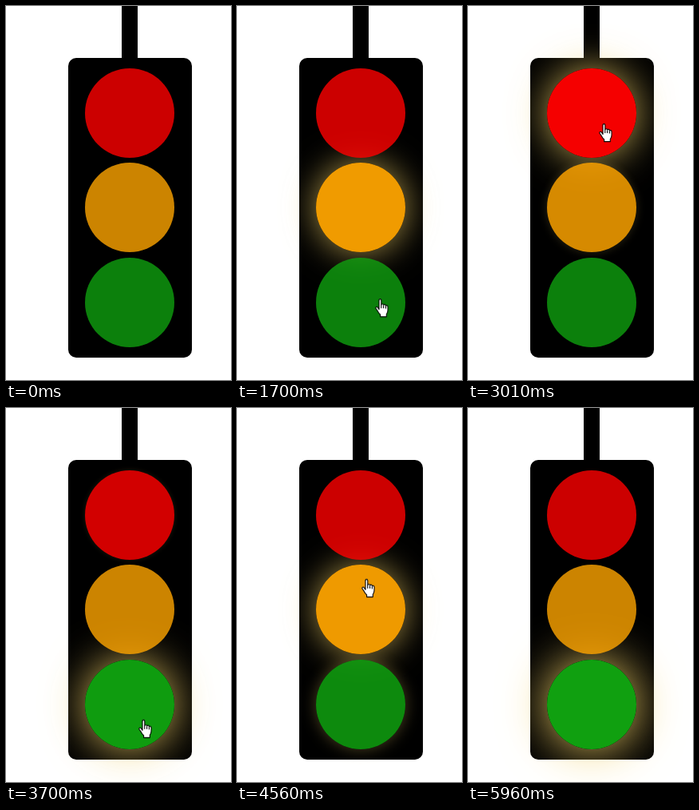
An HTML page that plays this animation: 282 px wide and 468 px high, repeating every 6420 ms.

```html
<!DOCTYPE html>
<html lang="en">
<head>
<meta charset="utf-8">
<title>Traffic light</title>
<style>
@property --lit { syntax: "<number>"; inherits: false; initial-value: 0; }

html, body { margin: 0; width: 100%; height: 100%; overflow: hidden; background: #fff; }
.stage { position: relative; width: 282px; height: 468px; overflow: hidden; }
.stage > * { position: absolute; }

.pole { left: 145px; top: 0; width: 20px; height: 70px; background: #000; }
.case { left: 78px; top: 65px; width: 155px; height: 375px; border-radius: 10px; background: #000; }

.glow, .lamp {
  left: 99px; width: 112px; height: 112px; border-radius: 50%;
  animation: 6420ms ease infinite;
}
.glow { box-shadow: 0 0 calc(60px * var(--lit)) rgb(240 208 104 / var(--lit)); }
.lamp { background: var(--color); opacity: calc(.8 + .2 * var(--lit)); }

.red { --color: #f00; top: 78px; animation-name: red; }
.amber { --color: #ffa500; top: 196px; animation-name: amber; }
.green { --color: #10a010; top: 315px; animation-name: green; }

@keyframes amber {
  0%, 22.9% { --lit: 0; }
  31.46%, 42.52% { --lit: 1; }
  51.09%, 68.54% { --lit: 0; }
  74.77% { --lit: 1; }
  83.33%, 100% { --lit: 0; }
}
@keyframes red {
  0%, 42.52% { --lit: 0; }
  51.09%, 52.49% { --lit: 1; }
  61.06%, 74.77% { --lit: 0; }
  83.33%, 84.58% { --lit: 1; }
  92.37%, 100% { --lit: 0; }
}
@keyframes green {
  0%, 52.49% { --lit: 0; }
  61.06%, 68.54% { --lit: 1; }
  74.77%, 84.58% { --lit: 0; }
  92.37%, 100% { --lit: 1; }
}

.hand { left: 0; top: 0; overflow: visible; animation: point 6420ms linear infinite; }
@keyframes point {
  0% { transform: translate(264px, 470px); }
  1.09% { transform: translate(262px, 455px); }
  6.23% { transform: translate(232px, 320px); }
  10.9% { transform: translate(256px, 192px); }
  15.58% { transform: translate(160px, 215px); }
  17.91% { transform: translate(143px, 240px); }
  21.5% { transform: translate(158px, 300px); }
  26.48% { transform: translate(173px, 366px); }
  27.88% { transform: translate(176px, 385px); }
  32.4% { transform: translate(184px, 160px); }
  39.56%, 46.88% { transform: translate(164px, 146px); }
  51.71% { transform: translate(168px, 385px); }
  57.63% { transform: translate(166px, 390px); }
  62.62% { transform: translate(161px, 322px); }
  63.86% { transform: translate(161px, 306px); }
  71.03% { transform: translate(156px, 214px); }
  76.32% { transform: translate(152px, 130px); }
  80.22% { transform: translate(150px, 135px); }
  84.42% { transform: translate(152px, 373px); }
  90.34%, 100% { transform: translate(165px, 470px); }
}
</style>
</head>
<body>
<div class="stage">
  <div class="pole"></div>
  <div class="case"></div>
  <div class="glow red"></div>
  <div class="glow amber"></div>
  <div class="glow green"></div>
  <div class="lamp red"></div>
  <div class="lamp amber"></div>
  <div class="lamp green"></div>
  <svg class="hand" width="17" height="24" fill="#fff" stroke="#000" stroke-width="1.1" stroke-linejoin="round">
    <path d="M5 13.5V2Q5 .6 6.4 .6T7.8 2V7.6Q8 6.6 9.3 6.7T10.6 8Q11 7.2 12.2 7.4T13.4 8.9Q13.8 8.3 14.9 8.6T16 10.2V14.5Q16 17 14.3 19.5V22.6H6.6V20Q4.5 18 3.2 15.4L1 12.2Q.4 10.8 1.6 10.4T3.6 11.4Z"/>
    <path fill="none" d="M7.8 7.6V12M10.6 8.5V12M13.4 9.2V12.4"/>
  </svg>
</div>
</body>
</html>
```
